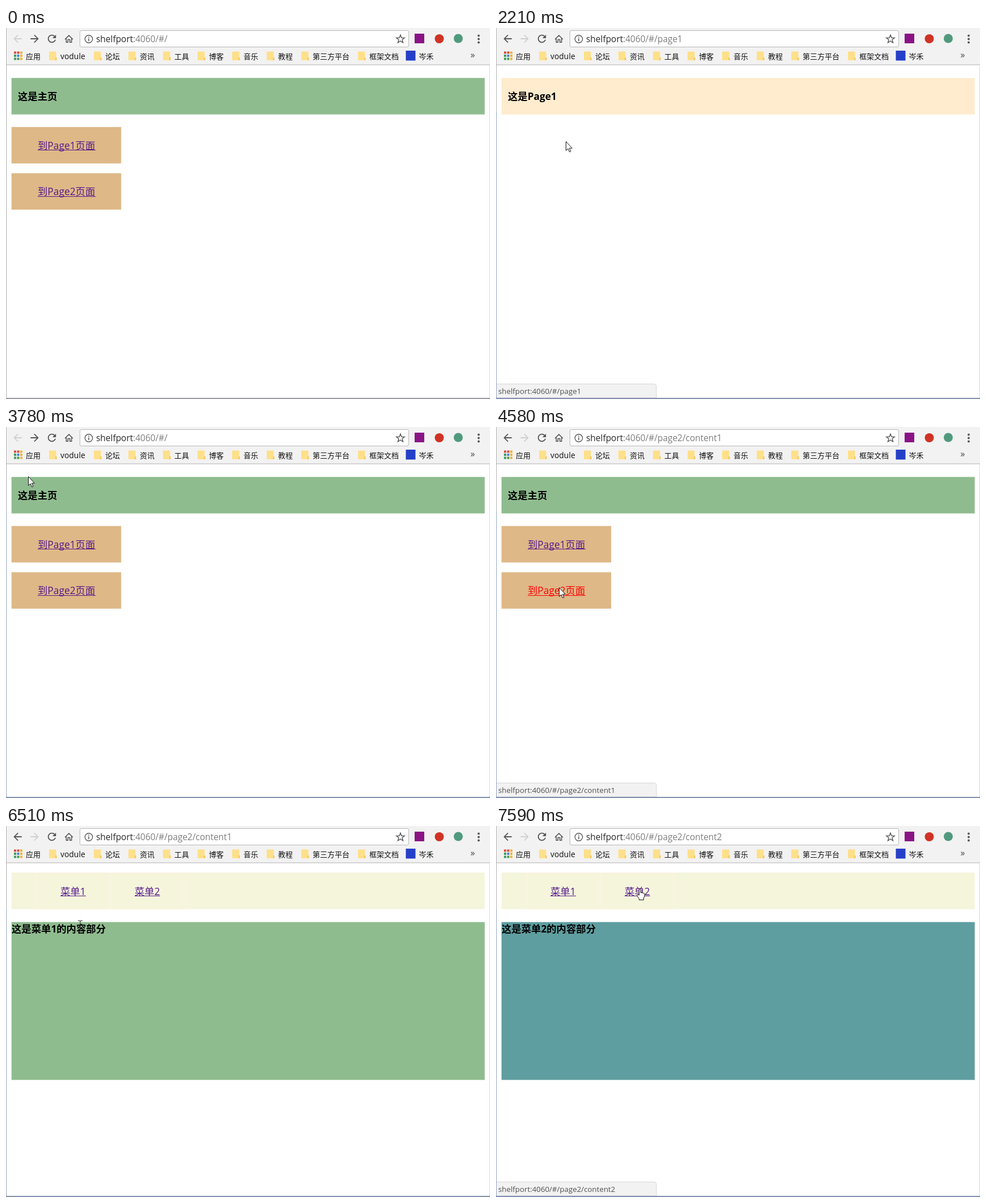
An HTML page that plays this animation: 854 by 655 pixels, repeating every 8000 ms.

```html
<!DOCTYPE html>
<html lang="zh">
<head>
<meta charset="utf-8">
<style>
html, body { margin: 0; width: 100%; height: 100%; overflow: hidden; background: #fff; }
svg { display: block; width: 854px; height: 655px; }
text { font-family: "Open Sans", "Noto Sans CJK SC", "Noto Sans CJK", sans-serif; font-size: 17.35px; white-space: pre; }
.bold { font-weight: bold; }
.mark { font-size: 13px; fill: #111; }
.link { color: #551a8b; fill: currentColor; }
.link.active { color: #f00; }
</style>
</head>
<body>
<svg id="stage" viewBox="0 0 854 655"></svg>
<script>
const LOOP = 8000, STEP = 78, HOST = 'shelfport', PORT = ':4060/#/';

const rect = (x, y, w, h, fill, more = '') =>
  `<rect x="${x}" y="${y}" width="${w}" height="${h}" fill="${fill}" ${more}/>`;
const text = (x, y, s, more = '') => `<text x="${x}" y="${y}" ${more}>${s}</text>`;
const title = (x, y, s) => text(x, y, s, 'class="bold"');
const bar = (y, h, fill, more) => rect(9.7, y, 835, h, fill, more);
const button = y => rect(9.7, y, 193.5, 64.3, '#deb887');
const link = (id, x, y, w, s) =>
  `<g id="${id}" class="link">${text(x, y, s)}${rect(x, Math.round(y + 1.5), w, 1, 'currentColor')}</g>`;

const arrowIcon = 'M20 11H7.83l5.59-5.59L12 4l-8 8 8 8 1.41-1.41L7.83 13H20z';
const reloadIcon = 'M17.65 6.35C16.2 4.9 14.21 4 12 4c-4.42 0-8 3.58-8 8s3.58 8 8 8c3.73 0 6.84-2.55 7.73-6h-2.08' +
  'c-.82 2.33-3.04 4-5.65 4-3.31 0-6-2.69-6-6s2.69-6 6-6c1.66 0 3.14.69 4.22 1.78L13 11h7V4z';
const icon = (id, cx, d, flip = 1) =>
  `<path id="${id}" d="${d}" fill="#555" transform="translate(${cx} 19) scale(${.9 * flip} .9) translate(-12 -12)"/>`;

const star = Array.from({ length: 10 }, (_, i) => {
  const r = i % 2 ? 3.2 : 7.6, a = i * Math.PI / 5;
  return `${696 + r * Math.sin(a)},${19.8 - r * Math.cos(a)}`;
}).join(' ');

const apps = ['#dd4b3e', '#dd4b3e', '#f0b23a', '#3f9d5c', '#4285dd', '#f0b23a', '#3f9d5c', '#3f9d5c', '#f0b23a']
  .map((c, i) => rect(14 + i % 3 * 5.5, 41.5 + (i / 3 | 0) * 5.5, 4, 4, c)).join('');

const bookmarks = [[96, 'vodule'], [175, '论坛'], [236, '资讯'], [297, '工具'], [358, '博客'],
  [419, '音乐'], [480, '教程'], [541, '第三方平台'], [641, '框架文档']]
  .map(([x, s], i) => rect(x - 20, 41.5, 12.5, 15.5, '#fee08a', 'rx="1"') +
    rect(x - 9, 52, 2.5, 5, '#f6c95e') +
    text(x, 54.5, s, `class="mark"${i ? '' : ' style="font-size:13.9px"'}`)).join('');

const toolbar = rect(0, 0, 854, 65, '#f2f2f2') + rect(0, 64.5, 854, 1, '#b4b4b4') +
  '<circle id="hover" cx="21" cy="19" r="17"/>' +
  icon('back', 20.5, arrowIcon) + icon('next', 50.5, arrowIcon, -1) + icon('reload', 81, reloadIcon) +
  '<path d="M104 20L111 13L118 20M106.3 18.5V25.3H109.3V20.5H112.7V25.3H115.7V18.5" fill="none" stroke="#555" stroke-width="1.5"/>' +
  rect(130.5, 4.5, 580, 29, '#fff', 'rx="2.5" stroke="#b8b8b8"') +
  '<circle cx="146" cy="19.5" r="6.7" fill="none" stroke="#5a5a5a" stroke-width="1.4"/>' +
  rect(145.2, 18.3, 1.6, 5, '#5a5a5a') + rect(145.2, 15.3, 1.6, 1.7, '#5a5a5a') +
  `<text x="159" y="25" style="font-size:15.45px" fill="#7d7d7d"><tspan fill="#2a2a2a">${HOST}</tspan>${PORT}<tspan id="path"></tspan></text>` +
  `<polygon points="${star}" fill="none" stroke="#555" stroke-width="1.4"/>` +
  rect(721, 10, 17, 17, '#8a1485') +
  '<circle cx="764.5" cy="19" r="8" fill="#d03325"/><circle cx="798" cy="18.5" r="8" fill="#4f9a7d"/>' +
  [13.5, 19.5, 25.5].map(y => `<circle cx="834" cy="${y}" r="1.9" fill="#555"/>`).join('') +
  apps + text(35, 54.5, '应用', 'class="mark"') + bookmarks +
  rect(705.5, 40, 17, 17.5, '#2540c8') + text(728.5, 54.5, '岑禾', 'class="mark"') +
  text(819.5, 53, '»', 'style="font-size:16px" fill="#444"');

const menuPage = bar(82.2, 64.5, '#f5f5dc') +
  [54, 184.5].map(x => rect(x, 82.5, 130, 64.5, 'none', 'stroke="#fcf4e4"')).join('') +
  link('menu1', 96, 121.5, 45, '菜单1') + link('menu2', 227, 121.5, 45, '菜单2') +
  bar(169.6, 278.7, '#8fbc8f', 'id="panel"') +
  '<text id="panelTitle" x="10" y="188" class="bold"></text>';

const pages = {
  home: bar(88.2, 64.4, '#8fbc8f') + title(21, 127, '这是主页') +
    button(174.8) + link('link1', 56, 213.5, 102, '到Page1页面') +
    button(256.4) + link('link2', 56, 295, 102, '到Page2页面'),
  page1: bar(88.2, 64.4, '#ffebcd') + title(21, 127, '这是Page1'),
  menu: menuPage
};

const cursors = {
  arrow: '<path d="M.5.5V16.3L4.1 13L6.6 18.8L9 17.8L6.5 12.2H11.3Z" fill="#fff" stroke="#111"/>',
  hand: '<path d="M-1.4 11V1.4a1.4 1.4 0 0 1 2.8 0V7.2a1.3 1.3 0 0 1 2.5.3a1.2 1.2 0 0 1 2.2.6a1.1 1.1 0 0 1 1.9.8V13L6.5 16.5V19.5H-1.5V17.5L-5 12.2a1.3 1.3 0 0 1 2-1.6Z" fill="#fff" stroke="#111"/>',
  beam: '<path d="M-4-8H-1L0-7L1-8H4M0-7V7M-4 8H-1L0 7L1 8H4" fill="none" stroke="#222"/>'
};

const groups = set => Object.entries(set).map(([id, body]) => `<g id="${id}">${body}</g>`).join('');
stage.innerHTML = rect(0, 0, 854, 655, '#fff') + groups(pages) + toolbar +
  '<g id="status"><path d="M0 628.5H279a4 4 0 0 1 4 4V653H0Z" fill="#f2f2f2" stroke="#d6d6d6"/>' +
  '<text id="statusText" x="4" y="646" style="font-size:13.3px" fill="#505050"></text></g>' +
  rect(0, 0, 1, 655, '#b2b2b4') + rect(853, 66, 1, 589, '#dcdce0') +
  '<g id="frame"><rect id="side" y="148" width="1" height="507"/><rect id="base" y="653" width="854" height="2"/></g>' +
  `<g id="pointer">${groups(cursors)}</g>`;

const el = id => document.getElementById(id);

// Each entry changes part of the state from its time on.
const events = [
  [0, { page: 'home', path: '', back: false, next: true, cursor: '', status: 0, target: 'page1', active: '', hover: 'none', focus: false, tab: 1 }],
  [280, { cursor: 'arrow' }],
  [1140, { cursor: 'hand' }],
  [1290, { status: .7 }],
  [1360, { status: 1, focus: true }],
  [1440, { active: 'link1' }],
  [1600, { path: 'page1', back: true, next: false, cursor: 'arrow' }],
  [1680, { page: 'page1', active: '' }],
  [2450, { status: .6 }],
  [2530, { status: .25 }],
  [2610, { status: 0 }],
  [3010, { hover: '#e0e0e0' }],
  [3170, { hover: '#d2d2d2' }],
  [3400, { page: 'home', path: '', back: false, next: true, hover: 'none' }],
  [4170, { cursor: 'hand', target: 'page2/content1' }],
  [4330, { status: .7 }],
  [4410, { status: 1 }],
  [4490, { active: 'link2' }],
  [4580, { path: 'page2/content1', back: true, next: false, cursor: 'arrow' }],
  [4640, { page: 'menu', active: '' }],
  [5400, { status: .6 }],
  [5480, { status: .25 }],
  [5560, { status: 0 }],
  [5790, { cursor: 'beam' }],
  [6590, { cursor: 'arrow' }],
  [6740, { cursor: 'hand' }],
  [6900, { status: .3 }],
  [6980, { cursor: 'arrow' }],
  [7060, { status: 0 }],
  [7210, { cursor: 'hand', target: 'page2/content2' }],
  [7380, { status: .7 }],
  [7440, { status: 1, active: 'menu2' }],
  [7590, { path: 'page2/content2', active: '', tab: 2 }]
];

// Pointer moves: start time, number of steps, end point.
const moves = [
  [280, 11, 127, 210], [1140, 1, 126, 204], [2140, 11, 14, 18], [3010, 1, 14, 19],
  [3550, 9, 111, 283], [4800, 3, 115, 294], [5090, 11, 111, 172], [5960, 5, 108, 164],
  [6510, 1, 131, 175], [6590, 4, 128, 117], [6900, 6, 254, 111]
];

function pointerAt(t) {
  let x = 641, y = 575;
  for (const [start, steps, tx, ty] of moves) {
    if (t < start) break;
    const u = Math.min(1, (Math.floor((t - start) / STEP) + 1) / steps);
    const e = u * u * (3 - 2 * u);
    x += (tx - x) * e;
    y += (ty - y) * e;
  }
  return [Math.round(x), Math.round(y)];
}

const show = (set, current) => {
  for (const id in set) el(id).style.display = id === current ? '' : 'none';
};

function draw(t) {
  const s = Object.assign({}, ...events.filter(e => e[0] <= t).map(e => e[1]));
  show(pages, s.page);
  show(cursors, s.cursor);
  el('pointer').setAttribute('transform', `translate(${pointerAt(t)})`);
  el('path').textContent = s.path;
  el('back').setAttribute('fill', s.back ? '#555' : '#d0d0d0');
  el('next').setAttribute('fill', s.next ? '#555' : '#d0d0d0');
  el('hover').setAttribute('fill', s.hover);
  el('status').setAttribute('opacity', s.status);
  el('statusText').textContent = HOST + PORT + s.target;
  for (const id of ['link1', 'link2', 'menu1', 'menu2']) el(id).classList.toggle('active', id === s.active);
  el('panel').setAttribute('fill', s.tab === 1 ? '#8fbc8f' : '#5f9ea0');
  el('panelTitle').textContent = `这是菜单${s.tab}的内容部分`;
  el('side').setAttribute('fill', s.focus ? '#93a5c4' : '#b2b2b4');
  el('base').setAttribute('fill', s.focus ? '#8290ac' : '#9a9aa6');
}

const begin = performance.now();
function tick() {
  draw((performance.now() - begin) % LOOP);
  requestAnimationFrame(tick);
}
tick();
</script>
</body>
</html>
```
